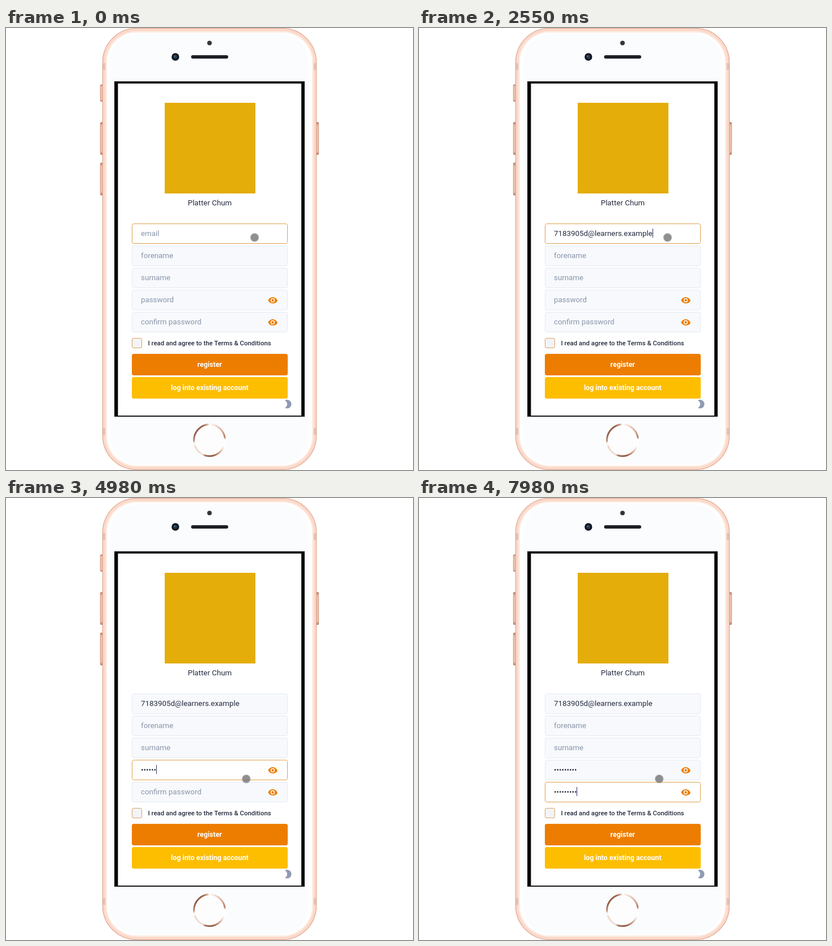
An HTML page that plays this animation: 718 px wide and 780 px high, repeating every 8 s.

```html
<!DOCTYPE html>
<html lang="en">
<head>
<meta charset="utf-8">
<title>Registration form</title>
<style>
  html, body { margin: 0; width: 100%; height: 100%; overflow: hidden; background: #fff; }
  #stage { position: relative; width: 718px; height: 780px; overflow: hidden; font: 13.33px/35px Roboto, sans-serif; color: #262c40; }
  #stage > *, #form > * { position: absolute; box-sizing: border-box; white-space: pre; }
  #home {
    left: 330px; top: 698px; width: 58px; height: 59px; border-radius: 50%;
    background: conic-gradient(#fff 0deg, #f6e4db 15deg, #dcae99 50deg, #b67c64 78deg, #fff 88deg, #fff 112deg,
      #f1d8cc 125deg, #c99078 145deg, #8d5842 170deg, #a87059 195deg, #f3dfd5 205deg, #f0d6c9 245deg,
      #fff 258deg, #c4917b 268deg, #8f5943 295deg, #97634d 335deg, #c99882 350deg, #fff 360deg);
  }
  #home::after { content: ""; position: absolute; inset: 2.6px; border-radius: 50%; background: #fdfdfe; }
  #logo { left: 280px; top: 132px; width: 160px; height: 160px; background: #e4ad0a; }
  #title { left: 198px; top: 290.5px; width: 323px; text-align: center; }
  #form { left: 222px; top: 0; width: 274.5px; height: 684px; }
  .field { left: 0; width: 100%; height: 35.5px; padding-left: 15px; line-height: 33.5px; border: 1px solid #e4e9f2; border-radius: 3.5px; background: #f7f9fc; }
  .field.focus { border-color: #dfa04c; background: #fff; }
  .field.error { border-color: #bd747a; }
  .hint { color: #8a95aa; }
  .caret { display: inline-block; width: 1px; height: 16px; margin-right: -1px; vertical-align: -3px; background: #2a3563; }
  .eye { position: absolute; right: 17px; top: 10.5px; }
  #error { left: 0; top: 534px; line-height: 17px; font-size: 10.67px; color: #c0716f; }
  #rest { left: 0; top: 0; width: 100%; }
  #rest > * { position: absolute; box-sizing: border-box; white-space: pre; }
  #check { left: 0; top: 547px; width: 18px; height: 18px; border: 1px solid #dda062; border-radius: 3px; background: #f2f4fa; }
  #terms { left: 28.5px; top: 538.5px; font-size: 11.42px; font-weight: 500; }
  .button { left: 0; width: 100%; height: 38px; border-radius: 3.5px; line-height: 38px; text-align: center; font-size: 12.4px; font-weight: 700; color: #fff; }
  #pointer { left: -8px; top: -8px; width: 16px; height: 16px; border-radius: 50%; border: 1.5px solid rgba(150,150,150,.45); background: rgba(112,112,112,.78); background-clip: padding-box; }
</style>
</head>
<body>
<div id="stage">
  <svg id="phone" width="718" height="780">
    <defs>
      <linearGradient id="key" x2="0" y2="1">
        <stop offset="0" stop-color="#a8745f"/><stop offset=".1" stop-color="#eebfaa"/>
        <stop offset=".9" stop-color="#eebfaa"/><stop offset="1" stop-color="#a8745f"/>
      </linearGradient>
    </defs>
    <g fill="url(#key)" stroke="#c8917b" stroke-width=".8">
      <rect x="166.4" y="100" width="6" height="29.5" rx="1.5"/>
      <rect x="166.4" y="166.4" width="6" height="57" rx="1.5"/>
      <rect x="166.4" y="238" width="6" height="57" rx="1.5"/>
      <rect x="545.6" y="166.4" width="6" height="57" rx="1.5"/>
    </g>
    <rect x="170.5" y=".5" width="377" height="779" rx="60" fill="#fbd9ca" stroke="#dfa58e" stroke-width="1.2"/>
    <path d="M171 62h6v12h-6zM541 62h6v12h-6zM171 706h6v12h-6zM541 706h6v12h-6z" fill="#e3c3b6"/>
    <rect x="175.5" y="5.5" width="367" height="769" rx="55" fill="#fdeae1"/>
    <rect x="178" y="8" width="362" height="764" rx="52" fill="#fff"/>
    <rect x="184" y="11" width="350" height="758" rx="47" fill="#fafcfe"/>
    <circle cx="359" cy="26.5" r="4" fill="#363639"/>
    <circle cx="298.8" cy="51" r="6.7" fill="#11151d"/>
    <circle cx="298.8" cy="51" r="3.4" fill="#24384f"/>
    <circle cx="297.5" cy="49.8" r="1.2" fill="#5d7791"/>
    <rect x="326.5" y="48" width="65.5" height="6" rx="3" fill="#1e1f24"/>
    <rect x="191.5" y="94.5" width="335" height="591" fill="#050505" stroke="#2a2a2a"/>
    <rect x="197.5" y="98" width="323.5" height="586" fill="#fff"/>
    <path d="M492 657.2A7.6 7.6 0 1 1 492 670.2A7.3 7.3 0 0 0 492 657.2Z" fill="#8f9bb3"/>
  </svg>
  <div id="home"></div>
  <div id="logo"></div>
  <div id="title">Platter Chum</div>
  <div id="form">
    <div id="error">Does not match with your password.</div>
    <div id="rest">
      <div id="check"></div>
      <div id="terms">I read and agree to the Terms &amp; Conditions</div>
      <div class="button" style="top:575px;background:#ed7d00">register</div>
      <div class="button" style="top:616.4px;background:#fdbe00">log into existing account</div>
    </div>
  </div>
  <div id="pointer"></div>
</div>
<script>
  const LOOP = 8000;
  const EMAIL = '7183905d@learners.example';
  const SECRET = '•'.repeat(9);
  const EYE = `<svg class="eye" width="17" height="13" viewBox="-8.5 -6.5 17 13">
    <path d="M-8 0C-6.7 -3.2 -3.6 -5.5 0 -5.5S6.7 -3.2 8 0S3.6 5.5 0 5.5S-6.7 3.2 -8 0Z" fill="#ed7d00"/>
    <circle r="3.7" fill="#fff"/><circle r="2.2" fill="#ed7d00"/></svg>`;

  // focus: when the field is entered and left; start/step: key rhythm
  const fields = [
    { hint: 'email', text: EMAIL, focus: [-700, 3150], start: 600, step: 78 },
    { hint: 'forename' },
    { hint: 'surname' },
    { hint: 'password', text: SECRET, focus: [3150, 5950], start: 4150, step: 150, eye: true },
    { hint: 'confirm password', text: SECRET, focus: [5950, LOOP], start: 6680, step: 135, eye: true }
  ];
  const byId = id => document.getElementById(id);

  fields.forEach((field, i) => {
    const box = field.box = document.createElement('div');
    box.className = 'field';
    box.style.top = 345.4 + 38.9 * i + 'px';
    box.innerHTML = '<span></span><i class="caret"></i><span class="hint"></span>' + (field.eye ? EYE : '');
    [field.value, field.caret, field.label] = box.children;
    byId('form').append(box);
  });

  const typedCount = ({ text = '', start, step }, t) =>
    text && t >= start ? Math.min(text.length, Math.floor((t - start) / step) + 1) : 0;

  function drawField(field, t) {
    const count = typedCount(field, t);
    const [enter, leave] = field.focus || [LOOP, LOOP];
    const focused = t >= enter && t < leave;
    const lastInput = count ? field.start + (count - 1) * field.step : enter;
    const blinkOn = (t - lastInput) % 1000 < 500;
    field.value.textContent = count ? field.text.slice(0, count) : '';
    field.label.textContent = count ? '' : field.hint;
    field.caret.style.display = focused ? '' : 'none';
    field.caret.style.opacity = blinkOn ? 1 : 0;
    field.box.classList.toggle('focus', focused);
    return count;
  }

  function draw(now) {
    const t = now % LOOP;
    const counts = fields.map(field => drawField(field, t));
    const mismatch = counts[4] > 0 && counts[4] < SECRET.length;
    fields[4].box.classList.toggle('error', mismatch);
    byId('error').style.visibility = mismatch ? 'visible' : 'hidden';
    byId('rest').style.top = mismatch ? '12.4px' : '0';

    const p = Math.max(0, Math.min(1, (t - 2620) / 460));
    const ease = p * p * (3 - 2 * p);
    byId('pointer').style.transform = `translate(${438.5 - 14.7 * ease}px, ${369.7 + 126 * ease}px)`;
    requestAnimationFrame(draw);
  }
  draw(performance.now());
</script>
</body>
</html>
```
